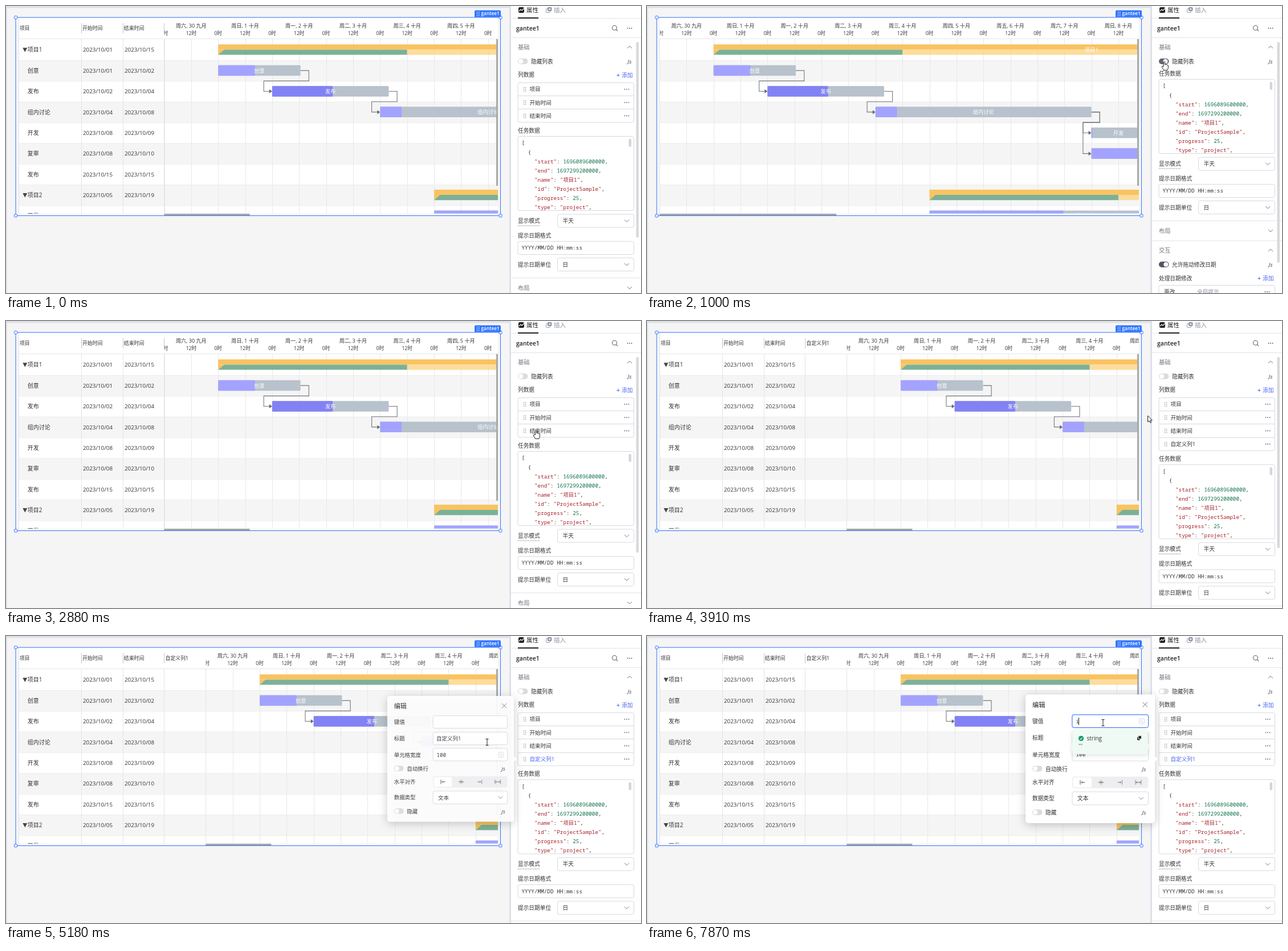
An HTML page with a canvas for the animation above (8000 ms loop, 1114x503 px).

```html
<!DOCTYPE html>
<html lang="zh">
<head>
<meta charset="utf-8">
<style>
  html, body { margin: 0; width: 100%; height: 100%; overflow: hidden; background: #f5f5f6; }
  canvas { display: block; }
</style>
</head>
<body>
<canvas id="stage" width="1114" height="503"></canvas>
<script>
const c = document.getElementById('stage').getContext('2d');
const SANS = '"Open Sans","Noto Sans CJK SC","Noto Sans CJK",sans-serif';
const MONO = '"Noto Sans Mono","Noto Sans CJK SC","Noto Sans CJK",monospace';
const BLUE = '#3377ff', ACCENT = '#4965f2', INK = '#333333', EDGE = '#d7d9df', GRAY = '#8b8fa3';
const DAY = 94.7, ROW = 36.37, TOP = 58.6, RIGHT = 863, BOTTOM = 363.5;
const clamp = v => Math.max(0, Math.min(1, v));
const ramp = (t, from, length) => clamp((t - from) / length);

function text(s, x, y, size = 9.7, color = INK, align = 'left', weight = 400, font = SANS) {
  c.font = `${weight} ${size}px ${font}`;
  c.textAlign = align;
  c.fillStyle = color;
  c.fillText(s, x, y + size * .37);
}
const mono = (s, x, y, color = INK) => text(s, x, y, 9.35, color, 'left', 400, MONO);
function fill(x, y, w, h, color) {
  c.fillStyle = color;
  c.fillRect(x, y, w, h);
}
function box(x, y, x2, y2, r, bg, border) {
  c.beginPath();
  c.roundRect(x, y, x2 - x, y2 - y, r);
  if (bg) { c.fillStyle = bg; c.fill(); }
  if (border) { c.strokeStyle = border; c.lineWidth = 1; c.stroke(); }
}
function line(points, color, width = 1) {
  c.beginPath();
  points.forEach(([x, y]) => c.lineTo(x, y));
  c.strokeStyle = color;
  c.lineWidth = width;
  c.stroke();
}
function shape(points, color) {
  c.beginPath();
  points.forEach(([x, y]) => c.lineTo(x, y));
  c.closePath();
  c.fillStyle = color;
  c.fill();
}
function disc(x, y, r, color) {
  c.beginPath();
  c.arc(x, y, r, 0, 7);
  c.fillStyle = color;
  c.fill();
}
function clipped(x, y, x2, y2, draw) {
  c.save();
  c.beginPath();
  c.rect(x, y, x2 - x, y2 - y);
  c.clip();
  draw();
  c.restore();
}
const chevron = (x, y, dir) => line([[x - 4, y - 2 * dir], [x, y + 2 * dir], [x + 4, y - 2 * dir]], '#777a86');
const dots = (x, y, color = '#555963') => [-3.5, 0, 3.5].forEach(d => disc(x + d, y, .9, color));
function grip(x, y, color) {
  for (let i = 0; i < 6; i++) fill(x + i % 2 * 3, y - 3.5 + (i >> 1) * 3, 1.3, 1.3, color);
}
const js = (x, y) => text('Js', x, y, 9.5, '#6f7380', 'center', 'italic 600');
function toggle(x, y, on) {
  box(x, y - 5, x + 17.5, y + 5, 5, '#dcdcdf');
  c.save();
  c.globalAlpha *= on;
  box(x, y - 5, x + 17.5, y + 5, 5, '#535663');
  c.restore();
  disc(x + 5.2 + on * 7.2, y, 4, '#fff');
}
function select(x, y, x2, label) {
  box(x, y - 11.5, x2, y + 11.5, 3, '#fff', EDGE);
  text(label, x + 9, y);
  chevron(x2 - 12.5, y, 1);
}

// ---- chart ----
const rowY = i => TOP + ROW * (i + .5);
// row, start day, length in days, progress, label, progress colour
const TASKS = [
  [1, 1, 1.525, .45, '创意', '#a3a3ff'],
  [2, 2, 2.16, .52, '发布', '#8282f5'],
  [3, 4, 4, .1, '组内讨论', '#a3a3ff'],
  [4, 8, 1, .02, '开发', '#a3a3ff'],
  [5, 8, 2, .5, '复审', '#a3a3ff'],
  [8, 5, 5.62, .442, '开发', '#a3a3ff'],
];
const LINKS = [[0, 1], [1, 2], [2, 3], [2, 4]];

function project(L, row, start, label) {
  const x = L + start * DAY, w = 14 * DAY, y = rowY(row), end = x + w * .25, mid = y - .4;
  fill(x, y - 9.5, w, 9.1, '#f9c361');
  fill(end, mid, x + w - end, 9.2, 'rgba(253,210,130,.78)');
  shape([[x, mid], [x + 11, mid], [x, y + 8.8]], '#f9c361');
  shape([[x, y + 8.8], [x + 10.5, mid], [end, mid], [end, y + 8.8]], '#7bb197');
  text(label, x + w / 2, y - .5, 9.3, '#fff', 'center');
}

function chart(L) {
  clipped(L, 21, RIGHT, BOTTOM, () => {
    for (let d = 0; d < 10; d++) {
      const x = L + d * DAY;
      text(`周${'六日一二三四五六日一'[d]}, ${d || 30} ${d ? '十' : '九'}月`, x + DAY / 2, 35, 9.1, INK, 'center');
      text('0时', x, 48, 8.6, INK, 'center');
      text('12时', x + DAY / 2, 48, 8.6, INK, 'center');
      for (const gx of [x, x + DAY / 2]) fill(Math.round(gx), 58, 1, 306, '#e7e8ea');
    }
    for (const [a, b] of LINKS) {
      const [r1, s1, n1] = TASKS[a], [r2, s2] = TASKS[b];
      const x1 = L + (s1 + n1) * DAY, x2 = L + s2 * DAY, y1 = rowY(r1), y2 = rowY(r2), mid = y1 + ROW / 2;
      line([[x1, y1], [x1 + 14.7, y1], [x1 + 14.7, mid], [x2 - 14.7, mid], [x2 - 14.7, y2], [x2 - 4, y2]], '#73777b', 1.1);
      shape([[x2, y2], [x2 - 5, y2 - 3.5], [x2 - 5, y2 + 3.5]], '#666a6e');
    }
    project(L, 0, 1, '项目1');
    project(L, 7, 5, '项目2');
    for (const [row, start, days, done, label, color] of TASKS) {
      const x = L + start * DAY, w = days * DAY, y = rowY(row);
      box(x, y - 9.3, x + w, y + 9.2, 1.5, '#b8c2cc');
      box(x, y - 9.3, x + w * done, y + 9.2, 1.5, color);
      text(label, x + w / 2, y, 9.2, '#fff', 'center');
    }
  });
  const w = RIGHT - L - 1;
  fill(860, 58, 3, 257, '#a9a9a9');
  fill(L, 364, w * w / 2275, 3, '#a6a6a6');
}

const TABLE = [
  ['项目1', '01', '15'], ['创意', '01', '02'], ['发布', '02', '04'], ['组内讨论', '04', '08'], ['开发', '08', '09'],
  ['复审', '08', '10'], ['发布', '15', '15'], ['项目2', '05', '19'], ['开发', '05', '10'],
];
function table(L) {
  clipped(22, 21, L + 1, 364, () => {
    fill(22, 21, 1, 343, '#e2e4e8');
    ['项目', '开始时间', '结束时间', '自定义列1'].forEach((s, i) => {
      const x = i ? 59.3 + i * 72.8 : 22;
      text(s, x + 1.9, 39, 8.9);
      if (i) {
        fill(Math.round(x - .3), 30, 1, 18, '#c4c6ca');
        fill(Math.round(x - .3), 58, 1, 306, '#e2e4e8');
      }
    });
    fill(L, 58, 1, 306, '#e2e4e8');
    TABLE.forEach(([name, from, to], i) => {
      const y = rowY(i);
      if (name.startsWith('项目')) shape([[29.3, y - 3.5], [37.3, y - 3.5], [33.3, y + 4]], '#444');
      text(name, 37.7, y, 10);
      text('2023/10/' + from, 135, y, 9.8);
      text('2023/10/' + to, 208, y, 9.8);
    });
  });
}

function workspace(L) {
  fill(0, 0, 886, 503, '#dfe1e8');
  fill(2, 3.5, 881, 500, '#f5f5f6');
  fill(22, 21, RIGHT - 22, 343, '#fff');
  fill(22, 57, RIGHT - 22, 1, '#e4e5e8');
  clipped(22, TOP, RIGHT, 364, () => {
    for (let i = 1; i < 9; i++) {
      if (i % 2) fill(22, TOP + i * ROW, 841, ROW, '#f5f5f5');
      fill(22, TOP + i * ROW, 841, 1, '#ededee');
    }
  });
  chart(L);
  if (L > 22) table(L);
  box(17, 20, 867.5, 367.5, 0, null, BLUE);
  for (const x of [17, 867.5]) for (const y of [20, 367.5]) box(x - 2.5, y - 2.5, x + 2.5, y + 2.5, 1, '#fff', BLUE);
  box(822, 7.5, 868, 19.5, [2, 2, 0, 0], BLUE);
  grip(826, 13.5, '#fff');
  text('gantee1', 833.5, 13.2, 8.3, '#fff', 'left', 600);
}

// ---- property panel ----
const CODE = ['[', '  {', '    "start": 1696089600000,', '    "end": 1697299200000,', '    "name": "项目1",',
  '    "id": "ProjectSample",', '    "progress": 25,', '    "type": "project",'];

function codeLine(s, x, y) {
  for (const part of s.match(/"[^"]*"|\d+|[^"\d]+/g)) {
    mono(part, x, y, part[0] === '"' ? '#a8232b' : /\d/.test(part) ? '#11734b' : INK);
    x += c.measureText(part).width;
  }
}

function addLink(y) {
  text('+', 1071, y, 10.5, ACCENT, 'left', 600);
  text('添加', 1080, y, 9.7, ACCENT);
}

function settings(o) {
  const y = v => v + o;
  text('任务数据', 898, y(218));
  box(898, y(228.5), 1101.5, y(358.5), 3, '#fff', EDGE);
  clipped(899, y(229), 1101, y(358), () => CODE.forEach((s, i) => codeLine(s, 904.5, y(240 + i * 16.05))));
  box(1092.5, y(233), 1097, y(247), 2, '#d5d5d7');
  text('显示模式', 898, y(376.5));
  c.setLineDash([1.5, 1.5]);
  line([[898, y(385)], [936, y(385)]], '#777');
  c.setLineDash([]);
  select(967.5, y(376.5), 1101.5, '半天');
  text('提示日期格式', 898, y(402));
  box(898, y(412.5), 1101.5, y(435.5), 3, '#fff', EDGE);
  mono('YYYY/MM/DD HH:mm:ss', 904.5, y(424));
  text('提示日期单位', 898, y(453.5));
  select(967.5, y(453), 1101.5, '日');
  fill(886, Math.round(y(476)), 228, 1, '#e3e4e9');
  text('布局', 898, y(494), 10.3, '#70747f');
  chevron(1094, y(494), 1);
  fill(886, Math.round(y(511)), 228, 1, '#e3e4e9');
  text('交互', 898, y(528), 10.3, '#70747f');
  chevron(1094, y(528), -1);
  toggle(898, y(553), 1);
  text('允许拖动修改日期', 921, y(553));
  js(1094, y(553));
  text('处理日期修改', 898, y(577));
  addLink(y(577));
  box(898, y(589.5), 1101.5, y(613), 3, '#fff', EDGE);
  text('更改', 907, y(601));
  text('全局提示', 965, y(601), 9.7, GRAY);
  dots(1088, y(601));
}

function panel(t, columns) {
  fill(886, 0, 228, 503, '#fff');
  box(899, 2, 909, 12, 2.5, '#222');
  line([[900, 9], [903, 6], [905, 8], [909, 4]], '#fff', 1.2);
  text('属性', 913, 7, 10.5, '#222', 'left', 500);
  box(947.5, 4.5, 954.5, 11.5, 2, null, GRAY);
  box(950, 2, 957.5, 9, 2, GRAY);
  line([[951.5, 5.5], [956, 5.5]], '#fff');
  line([[953.8, 3.3], [953.8, 7.7]], '#fff');
  text('插入', 961, 7, 10.5, GRAY);
  fill(886, 21, 228, 1, '#e3e4e9');
  fill(898, 20, 36, 2, '#222');
  text('gantee1', 895, 39, 10.5, '#222', 'left', 600);
  c.beginPath();
  c.arc(1067.5, 38.3, 4, 0, 7);
  c.strokeStyle = '#666';
  c.lineWidth = 1.1;
  c.stroke();
  line([[1070.3, 41.2], [1073, 44]], '#666', 1.1);
  dots(1094, 39);
  fill(886, 55, 228, 1, '#e3e4e9');
  text('基础', 898, 72, 10.3, '#70747f');
  chevron(1094, 72, -1);
  toggle(898, 97, ramp(t, 860, 160) - ramp(t, 1590, 180));
  text('隐藏列表', 921, 97);
  js(1094, 97);
  if (columns) {
    text('列数据', 898, 120.5);
    addLink(121);
    box(898, 134.5, 1101.5, 134 + columns * 23.3, 3, '#fff', EDGE);
    ['项目', '开始时间', '结束时间', '自定义列1'].slice(0, columns).forEach((s, i) => {
      const y = 145.8 + i * 23.3, color = i === 3 && t >= 5060 ? ACCENT : INK;
      if (i) fill(898, Math.round(y - 12), 203, 1, EDGE);
      grip(908, y, '#85899a');
      text(s, 918.5, y, 9.6, color);
      dots(1089, y);
    });
  }
  settings([-100, 0, 0, 0, 23.3][columns]);
  // the scrollbar hides once the pointer has left the panel
  if (t < 4230) box(1105.5, 63, 1110, columns ? columns > 3 ? 398 : 406 : 450, 2.2, '#d9d9dc');
}

// ---- column editor ----
function valueIcon(x, y) {
  box(x - 4.5, y - 4.5, x + 4.5, y + 4.5, 2, '#fff', '#d5d7de');
  line([[x - 2, y - 2], [x, y], [x + 2, y + 2]], '#a2a6b3', .9);
}

function alignIcon(x, y, kind) {
  const bar = d => line([[x + d, y - 4], [x + d, y + 4]], '#555963');
  const arrow = (from, to) => {
    const s = Math.sign(to - from) * 2;
    line([[x + from, y], [x + to, y]], '#555963');
    line([[x + to - s, y - 2], [x + to, y], [x + to - s, y + 2]], '#555963');
  };
  c.save();
  if (kind) c.globalAlpha *= .7;
  if (kind === 0) { bar(-4); arrow(4, -2); }
  if (kind === 1) { bar(0); arrow(-5, -1); arrow(5, 1); }
  if (kind === 2) { bar(4); arrow(-4, 2); }
  if (kind === 3) { bar(-5); bar(5); arrow(0, -4); arrow(0, 4); }
  c.restore();
}

function suggestions() {
  c.save();
  c.shadowColor = 'rgba(0,0,0,.12)';
  c.shadowBlur = 8;
  c.shadowOffsetY = 2;
  box(746, 164, 879, 207, 3, '#effaf4');
  c.restore();
  disc(761.5, 179.5, 4.6, '#109c64');
  line([[759.3, 179.6], [761, 181.3], [763.8, 178]], '#fff', 1.1);
  text('string', 771.5, 179.5, 10);
  box(860, 177, 865, 182.5, 1, '#222');
  box(861.8, 174.8, 867.5, 180.3, 1, '#222', '#effaf4');
  text('""', 757, 193, 8.5, '#555');
}

function editor(t) {
  const p = 1 - (1 - ramp(t, 5100, 160)) ** 3;
  if (!p) return;
  const focus = ramp(t, 5960, 200), scale = .82 + .18 * p;
  c.save();
  c.globalAlpha = Math.min(1, p * 1.06);
  c.translate(891, 215.5);
  c.scale(scale, scale);
  c.translate(-891, -215.5);
  c.save();
  c.shadowColor = 'rgba(0,0,0,.22)';
  c.shadowBlur = 16;
  c.shadowOffsetY = 3;
  box(664, 102.5, 891, 328, 5, '#fff');
  c.restore();
  shape([[890, 210], [896, 215.5], [890, 221]], '#fff');
  text('编辑', 676, 120.5, 11.3, '#222', 'left', 500);
  line([[869.5, 116], [878, 124.5]], '#777', 1);
  line([[878, 116], [869.5, 124.5]], '#777', 1);
  text('键值', 676, 149.5);
  if (focus) {
    c.save();
    c.globalAlpha *= focus;
    box(744.5, 136.5, 880.5, 161.5, 4, '#d9e5ff');
    c.restore();
  }
  box(746, 138, 879.5, 160.5, 3, '#fff', focus ? BLUE : EDGE);
  text('标题', 676, 178.5);
  box(746, 167.5, 879.5, 190, 3, '#fff', EDGE);
  text('自定义列1', 752, 179);
  text('单元格宽度', 676, 208);
  box(746, 196.5, 879.5, 219, 3, '#fff', EDGE);
  mono('100', 752.5, 208);
  if (t < 5700) valueIcon(868, 208);
  if (t >= 6130) valueIcon(868, 149.5);
  toggle(676, 232.5, 0);
  text('自动换行', 699, 233);
  js(872, 233);
  text('水平对齐', 676, 256.5);
  box(746, 246.5, 879.5, 266.5, 4, '#eeeef0');
  box(747.5, 248, 780, 265, 3, '#fff');
  [764, 796.5, 829.5, 862].forEach((x, i) => alignIcon(x, 256.5, i));
  text('数据类型', 676, 284);
  select(746, 284.5, 879.5, '文本');
  toggle(676, 309, 0);
  text('隐藏', 699, 309.5);
  js(872, 309.5);
  const menu = ramp(t, 5700, 160);
  if (menu) {
    c.globalAlpha = menu;
    suggestions();
  }
  c.restore();
  const typed = t >= 7870;
  if (typed) mono('i', 752.5, 149.5);
  const caret = typed || t >= 5760 && Math.floor((t - 5760) / 527) % 2 === 0;
  if (caret) fill(typed ? 757 : 752, 143, 1, 13, '#222');
}

// ---- pointer: time, x, y, look from then on ----
const PATH = [
  [70, 1085, 404, 'arrow'], [300, 985, 190, 'arrow'], [480, 905, 99, 'arrow'], [530, 901, 97, 'hand'],
  [650, 901, 97, 'hand'], [690, 907.5, 97, 'hand'], [2200, 907.5, 97, 'arrow'], [2500, 913, 140, 'hand'], [2880, 929, 191, 'hand'],
  [3000, 1002, 168, 'hand'], [3310, 1086, 116, 'hand'], [3460, 1086, 116, 'arrow'], [3910, 879.5, 166, 'arrow'],
  [4260, 545, 150, 'arrow'], [4600, 700, 222, 'arrow'], [4850, 930, 212, 'hand'], [5090, 930, 212, 'hand'],
  [5150, 844, 186, 'beam'], [5240, 844, 186, 'beam'], [5700, 800, 152, 'beam'], [8000, 800, 152, 'beam'],
];
const LOOKS = {
  arrow: 'M0 0V11L2.6 8.7L4.4 12.5L6.1 11.8L4.4 8.1H7.8Z',
  hand: 'M-1.2 9V1Q0-.6 1.2 1V5.5Q2.3 4.8 3.3 6Q4.5 5.4 5.3 6.6Q6.9 6.3 6.9 8V11Q6.6 13 5.3 15.5H-1Q-2 13-4.2 10.2Q-4.5 8-2.4 8.3Z',
};
function pointer(t) {
  const i = PATH.findIndex(k => k[0] > t);
  if (i < 1) return;
  const [t0, x0, y0, look] = PATH[i - 1], [t1, x1, y1] = PATH[i], p = (t - t0) / (t1 - t0);
  c.save();
  c.translate(x0 + (x1 - x0) * p, y0 + (y1 - y0) * p);
  if (look === 'beam') {
    line([[0, -5], [0, 5]], '#222');
    for (const y of [-5.5, 5.5]) line([[-2.5, y], [2.5, y]], '#222');
  } else {
    const outline = new Path2D(LOOKS[look]);
    c.fillStyle = '#fff';
    c.fill(outline);
    c.strokeStyle = '#222';
    c.lineWidth = 1;
    c.stroke(outline);
  }
  c.restore();
}

function frame(now) {
  const t = now % 8000;
  const columns = t >= 3500 ? 4 : t >= 930 && t < 1670 ? 0 : 3;
  workspace(columns ? 59.1 + columns * 72.8 : 22);
  panel(t, columns);
  editor(t);
  pointer(t);
  requestAnimationFrame(frame);
}
requestAnimationFrame(frame);
</script>
</body>
</html>
```
